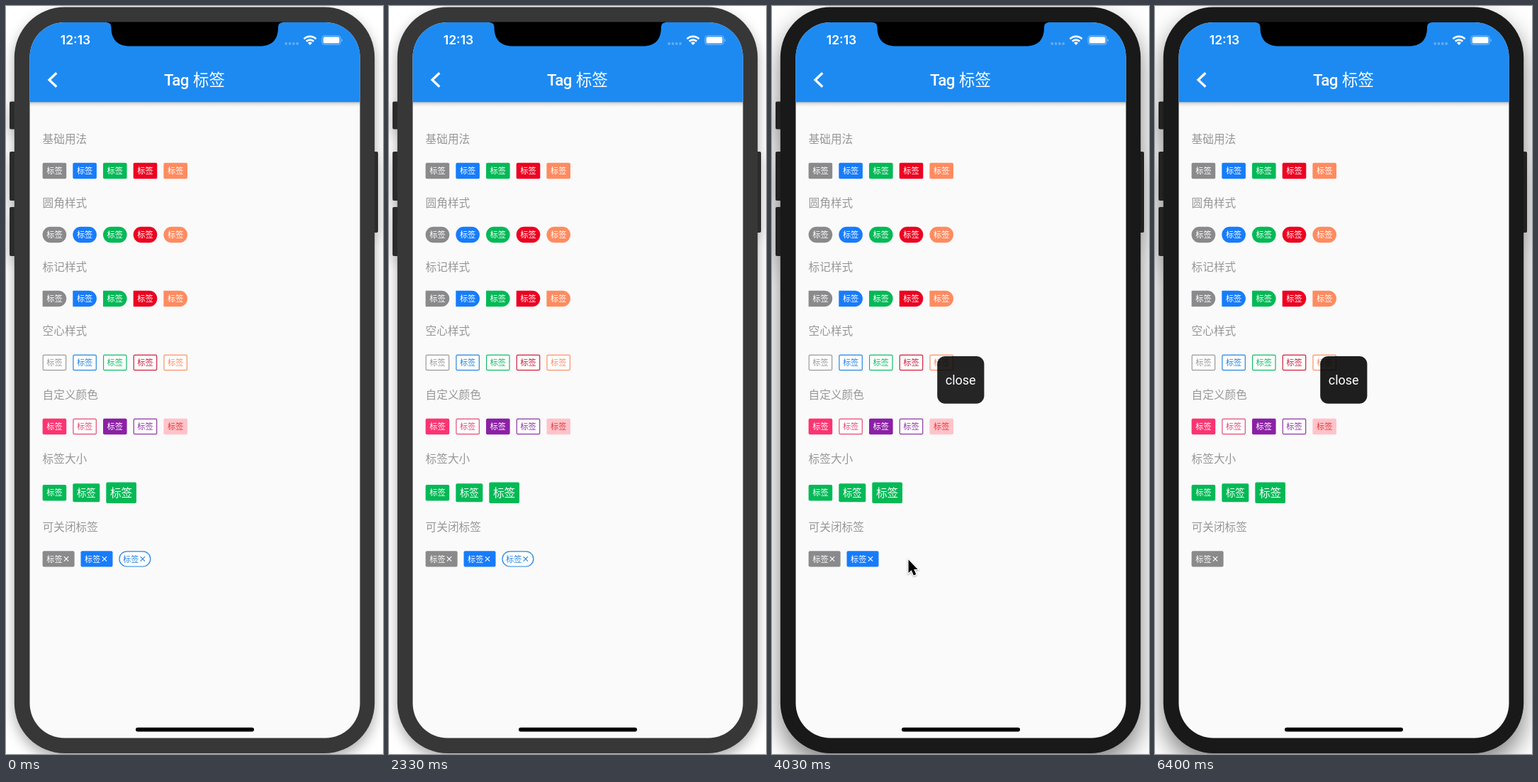
An HTML page for the animation above (6.43 s loop, 532 px wide and 1053 px high).

```html
<!DOCTYPE html>
<html lang="zh-CN">
<head>
<meta charset="utf-8">
<title>Tag 标签</title>
<style>
  html, body { margin: 0; width: 100%; height: 100%; overflow: hidden; background: #fff; }
  svg { display: block; width: 532px; height: 1053px; }
  text { font-family: "Noto Sans CJK SC", "Noto Sans CJK", sans-serif; }
  .latin { font-family: Inter, Roboto, sans-serif; }
  .narrow { font-family: Roboto, Inter, sans-serif; }
  #phone { filter: drop-shadow(0 8px 9px rgba(0, 0, 0, .32)); }
  .active #phone { filter: drop-shadow(0 16px 17px rgba(0, 0, 0, .5)); }
  #body { fill: #373737; }
  #buttons { fill: #2b2b2b; }
  .active #body { fill: #191919; }
  .active #buttons { fill: #222; }
  #pointer { filter: drop-shadow(0 1.5px 1.2px rgba(0, 0, 0, .35)); }
</style>
</head>
<body>
<svg id="stage" viewBox="0 0 532 1053">
  <defs>
    <clipPath id="screen"><rect x="33.5" y="23" width="466" height="1007.5" rx="49"/></clipPath>
    <linearGradient id="fade" x2="0" y2="1">
      <stop stop-color="#000" stop-opacity=".26"/>
      <stop offset=".4" stop-color="#000" stop-opacity=".09"/>
      <stop offset="1" stop-color="#000" stop-opacity="0"/>
    </linearGradient>
  </defs>

  <g id="phone">
    <g id="buttons">
      <rect x="5" y="134.5" width="10" height="39" rx="2"/>
      <rect x="5" y="205" width="10" height="69" rx="2"/>
      <rect x="5" y="283" width="10" height="69" rx="2"/>
      <rect x="515" y="205" width="10" height="114" rx="2"/>
    </g>
    <rect id="body" x="11.8" y="1.5" width="508.4" height="1050.5" rx="71"/>
  </g>

  <g clip-path="url(#screen)">
    <rect x="33" y="23" width="467" height="1008" fill="#fafafa"/>
    <rect x="33" y="135" width="467" height="7" fill="url(#fade)"/>
    <rect x="33" y="22" width="467" height="113.2" fill="#1d8af2"/>
  </g>
  <path id="notch" d="M142 22.5V23Q148.500 23.500 148.500 30C148.500 47 157 56.500 175 56.500H358C376 56.500 384 47 384 30Q384 23.500 390.500 23V22.5Z"/>

  <g fill="#fff">
    <text class="latin" x="98" y="54.300" font-size="17.500" font-weight="600" text-anchor="middle">12:13</text>
    <g id="signal" opacity=".3"></g>
    <path d="M429 55L426 51.900A4.300 4.300 0 0 1 432 51.900Z"/>
    <g id="wifi" fill="none" stroke="#fff" stroke-width="2.600"></g>
    <rect x="446" y="41.900" width="26.200" height="12.400" rx="3.300" fill="none" stroke="#fff" stroke-opacity=".45"/>
    <rect x="447.700" y="43.600" width="22.800" height="9" rx="1.900"/>
    <path d="M473.700 46.200a2.300 2.300 0 0 1 0 4z" opacity=".5"/>
    <path d="M71.300 94.200L61 104L71.300 113.800" fill="none" stroke="#fff" stroke-width="3.300"/>
    <text class="narrow" x="223" y="111.800" font-size="22.300" font-weight="500" letter-spacing="-.5">Tag</text>
    <text x="264" y="112" font-size="22.400" font-weight="500">标签</text>
  </g>

  <g id="content"></g>
  <rect x="183" y="1015.700" width="167" height="5.700" rx="2.850"/>

  <g id="toast">
    <rect x="233.200" y="493" width="66.200" height="66.800" rx="11.200" fill="#000" fill-opacity=".88"/>
    <text class="narrow" x="266.200" y="533" font-size="18" text-anchor="middle" fill="#fff">close</text>
  </g>
  <g id="pointer">
    <path d="M0 0V18.500L4.200 14.700L7.300 22L10.700 20.600L7.600 13.400H13Z" stroke="#fff" stroke-width="2.400" paint-order="stroke"/>
  </g>
</svg>

<script>
const LOOP = 6430;
const LEFT = 51.6, STEP = 42.7;
const GRAY = '#8a8a8c', BLUE = '#177cfb', GREEN = '#03b956', RED = '#ec0320', ORANGE = '#ff8b60';
const PINK = '#fc3471', PURPLE = '#8b20a5';
const FILLS = [GRAY, BLUE, GREEN, RED, ORANGE];
const OUTLINES = ['#999', '#2585e2', '#10bc66', '#cf1f3c', '#fa9167'];

const $ = id => document.getElementById(id);

function add(parent, name, attrs, text) {
  const node = document.createElementNS('http://www.w3.org/2000/svg', name);
  for (const key in attrs) node.setAttribute(key, attrs[key]);
  if (text) node.textContent = text;
  return parent.appendChild(node);
}

const content = $('content');

function heading(text, y) {
  add(content, 'text', { x: LEFT, y: y + 5.9, 'font-size': 15.65, fill: '#979797' }, text);
}

// A tag box centred on cy; left and right corners have their own radius.
function tag(x, cy, color, options = {}) {
  const { w = 33.6, h = 22.4, size = 11.2, left = 2, right = left, hollow, ink, closable } = options;
  const group = add(content, 'g', {});
  const inset = hollow ? .6 : 0;
  const x0 = x + inset, x1 = x + w - inset, y0 = cy - h / 2 + inset, y1 = cy + h / 2 - inset;
  const l = Math.max(left - inset, 0), r = Math.max(right - inset, 0);
  const arc = (rad, dx, dy) => `a${rad} ${rad} 0 0 1 ${dx} ${dy}`;
  add(group, 'path', {
    d: `M${x0 + l} ${y0}H${x1 - r}${arc(r, r, r)}V${y1 - r}${arc(r, -r, r)}` +
       `H${x0 + l}${arc(l, -l, -l)}V${y0 + l}${arc(l, l, -l)}Z`,
    fill: hollow ? '#fff' : color,
    stroke: hollow ? color : 'none',
    'stroke-width': 1.2
  });
  const textColor = ink || (hollow ? color : '#fff');
  add(group, 'text', { x: x + 5.6, y: cy + size * .38, 'font-size': size, fill: textColor }, '标签');
  if (closable) {
    add(group, 'path', {
      d: `M${x + 30.2} ${cy - 3.2}l6.4 6.4m0 -6.4l-6.4 6.4`,
      stroke: textColor, 'stroke-width': 1.15
    });
  }
  return group;
}

function row(y, colors, options) {
  colors.forEach((color, i) => tag(LEFT + i * STEP, y, color, options));
}

['基础用法', '圆角样式', '标记样式', '空心样式', '自定义颜色', '标签大小']
  .forEach((text, i) => heading(text, 187 + i * 90));
heading('可关闭标签', 733.5);

row(232, FILLS);
row(322, FILLS, { left: 11.2 });
row(412, FILLS, { left: .6, right: 11.2 });
row(502, OUTLINES, { hollow: true });

[
  [PINK],
  ['#e54a74', { hollow: true }],
  [PURPLE],
  ['#8c36a2', { hollow: true }],
  ['#ffc3c9', { ink: '#e53b3d' }]
].forEach(([color, options], i) => tag(LEFT + i * STEP, 592, color, options));

tag(LEFT, 685.2, GREEN);
tag(94.3, 685.2, GREEN, { w: 38, h: 26, size: 13.4 });
tag(141.3, 685.2, GREEN, { w: 42.7, h: 29.4, size: 15.65 });

const closing = { w: 45, closable: true };
tag(LEFT, 778.4, GRAY, closing);
const second = tag(105.5, 778.4, BLUE, closing);
const third = tag(159.4, 778.4, '#2585e2', { ...closing, left: 11.2, hollow: true });

for (let i = 0; i < 4; i++) add($('signal'), 'circle', { cx: 395.2 + i * 5.3, cy: 53, r: 1.9 });

for (const r of [7.4, 12.1]) {
  const d = r * Math.SQRT1_2;
  add($('wifi'), 'path', { d: `M${429 - d} ${55 - d}A${r} ${r} 0 0 1 ${429 + d} ${55 - d}` });
}

// Pointer stops: time, x, y.
const PATH = [
  [2660, -18, 846], [2930, 171.8, 808.5], [3120, 171.8, 808.5], [3560, 194, 779],
  [3830, 194, 779], [3960, 192.6, 779.5], [4420, 192.6, 779.5], [4850, 137.8, 777],
  [5700, 137.8, 777], [5980, 120, 1070]
];
const FOCUS = 3850, CLOSE_THIRD = 3885, CLOSE_SECOND = 5050, FADE = 150;

const ease = p => p * p * (3 - 2 * p);

function pointerAt(t) {
  const i = PATH.findIndex(stop => stop[0] > t);
  if (i < 1) return null;
  const [t0, x0, y0] = PATH[i - 1], [t1, x1, y1] = PATH[i];
  const p = ease((t - t0) / (t1 - t0));
  return [x0 + (x1 - x0) * p, y0 + (y1 - y0) * p];
}

function show(node, visible) {
  node.setAttribute('visibility', visible ? 'visible' : 'hidden');
}

function draw(t) {
  $('stage').classList.toggle('active', t >= FOCUS);
  show(third, t < CLOSE_THIRD);
  show(second, t < CLOSE_SECOND);

  const shown = t >= CLOSE_SECOND ? CLOSE_SECOND : CLOSE_THIRD;
  $('toast').setAttribute('opacity', Math.min(1, Math.max(0, (t - shown) / FADE)));

  const spot = pointerAt(t);
  show($('pointer'), spot);
  if (spot) $('pointer').setAttribute('transform', `translate(${spot})`);
}

const start = performance.now();
function tick() {
  draw((performance.now() - start) % LOOP);
  requestAnimationFrame(tick);
}
tick();
</script>
</body>
</html>
```
